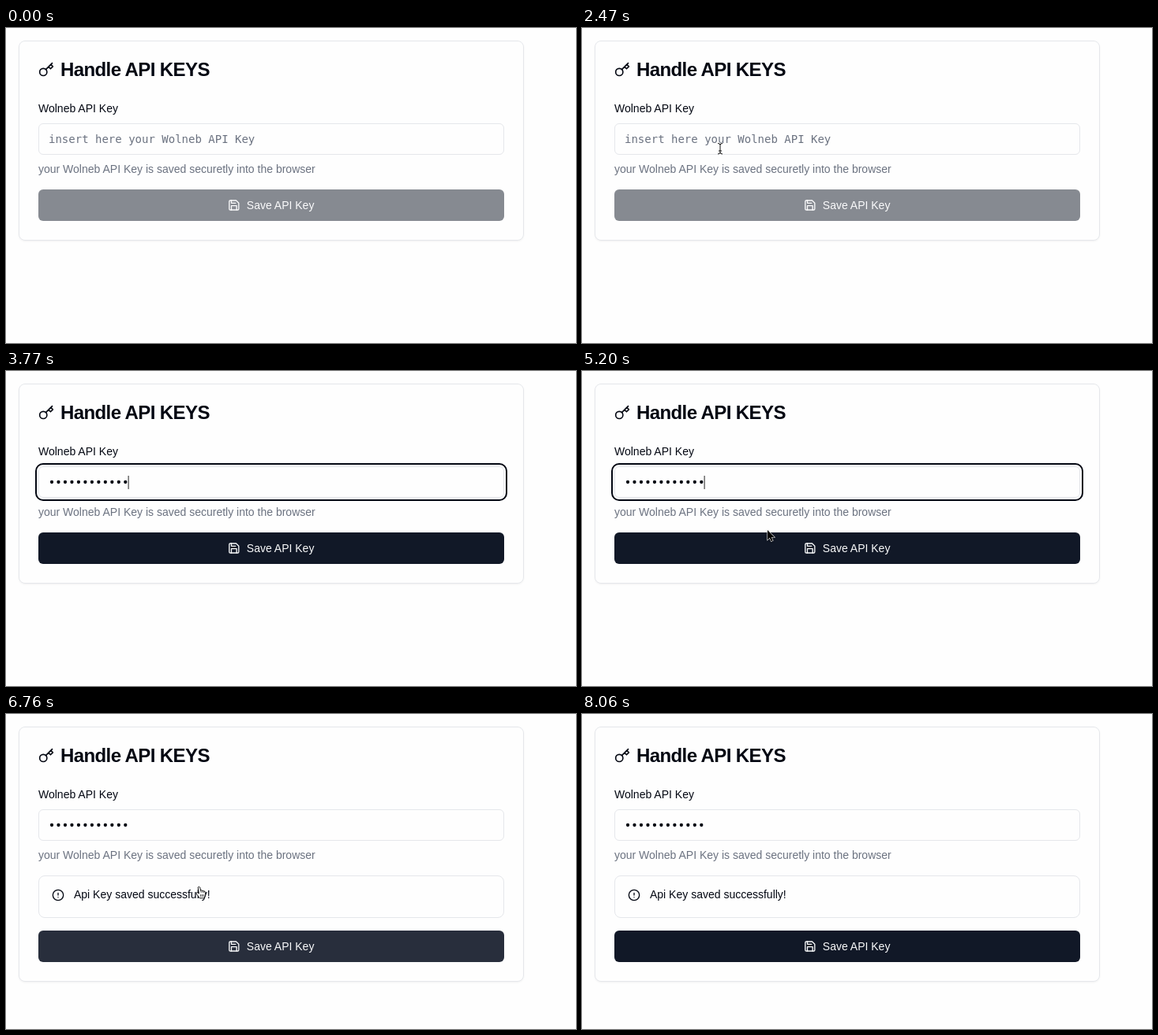
Recreate the animation shown at these times as an HTML page. Size 722 px wide and 400 px high, loop 9360 ms.

```html
<!DOCTYPE html>
<html lang="en">
<head>
<meta charset="utf-8">
<title>Handle API keys</title>
<style>
  html, body { margin: 0; width: 100%; height: 100%; overflow: hidden; background: #fefefe; }
  svg { display: block; }
  text { font: 14px "Liberation Sans", Arial, sans-serif; fill: #030712; }
  .title { font-size: 24px; font-weight: 700; letter-spacing: -0.6px; }
  .muted { fill: #6b7280; }
  .mono { font-family: "DejaVu Sans Mono", monospace; }
  .box { fill: none; stroke: #e5e7eb; }
  .icon { fill: none; stroke: #030712; stroke-width: 2; stroke-linecap: round; stroke-linejoin: round; }
  #button text { fill: #f9fafb; }
  #button .icon { stroke: #f9fafb; }
  #card { fill: #fefefe; filter: drop-shadow(0 1px 1px rgba(0, 0, 0, .05)); }
  .halo { fill: none; stroke: #fff; stroke-opacity: .7; stroke-width: 2.4; }
</style>
</head>
<body>
<svg width="722" height="400" viewBox="0 0 722 400">
  <rect id="card" class="box" x="16.5" y="16.5" width="639" height="253" rx="7.5"/>

  <g class="icon" transform="translate(41 43) scale(.8333)">
    <circle cx="7.5" cy="15.5" r="5.5"/>
    <path d="M21 2l-9.6 9.6M15.5 7.5l3 3L22 7l-3-3"/>
  </g>
  <text class="title" x="69" y="61">Handle API KEYS</text>

  <text x="41" y="107">Wolneb API Key</text>
  <rect class="box" x="41.5" y="121.5" width="589" height="39" rx="5.5"/>
  <rect id="ring" x="38" y="118" width="596" height="46" rx="9" fill="none" stroke="#030712" stroke-width="2"/>
  <text id="hint" class="mono muted" x="54" y="146">insert here your Wolneb API Key</text>
  <path id="dots" d="M58 141h94" fill="none" stroke="#030712" stroke-width="4.3" stroke-linecap="round" stroke-dasharray="0 8.48"/>
  <rect id="caret" y="133" width="1" height="17" fill="#222"/>
  <text class="muted" x="41" y="184">your Wolneb API Key is saved securetly into the browser</text>

  <g id="alert">
    <rect class="box" x="41.5" y="205.5" width="589" height="53" rx="7.5"/>
    <g class="icon" transform="translate(58 222) scale(.6667)">
      <circle cx="12" cy="12" r="10"/>
      <path d="M12 8v4M12 16h.01"/>
    </g>
    <text x="86" y="234">Api Key saved successfully!</text>
  </g>

  <g id="button">
    <rect id="face" x="41" y="205" width="590" height="40" rx="6" fill="#111827"/>
    <g class="icon" transform="translate(280.8 217) scale(.6667)">
      <path d="M19 21H5a2 2 0 0 1-2-2V5a2 2 0 0 1 2-2h11l5 5v11a2 2 0 0 1-2 2z"/>
      <path d="M17 21v-8H7v8M7 3v5h8"/>
    </g>
    <text x="304.8" y="230">Save API Key</text>
  </g>

  <g id="cursor">
    <path id="arrow" d="M0 0V12.4L2.8 9.8 4.7 14.2 6.8 13.3 4.9 9H8.8Z" fill="#000" stroke="#fff" stroke-width="1.1"
      paint-order="stroke" style="filter:drop-shadow(0 1px 1px rgba(0,0,0,.35))"/>
    <g id="beam">
      <path class="halo" d="M-3-6.5Q0-6.5 0-4.5V5Q0 7-3 7M3-6.5Q0-6.5 0-4.5M0 5Q0 7 3 7"/>
      <path d="M-3-6.5Q0-6.5 0-4.5V5Q0 7-3 7M3-6.5Q0-6.5 0-4.5M0 5Q0 7 3 7M-2 3H2" fill="none" stroke="#111"/>
    </g>
    <g id="hand" stroke="#000" stroke-width=".9" stroke-linejoin="round">
      <path d="M-1.8 1Q-.6-.6.6 1L1.6 5Q3 4.2 3.6 5.4 5 4.7 5.6 6 7.2 5.5 7.4 7.5V10.5Q7.2 13 5.8 14.8H.2Q-2 11.5-4.2 9-4 7.2-2.2 7.8L-.6 9Z" fill="#fff"/>
      <path d="M1.6 5l.5 2.6M3.6 5.4l.4 2.4M5.6 6l.2 2M1.6 10v3M3.4 10v3M5.2 10v3" fill="none" stroke-width=".7"/>
    </g>
  </g>
</svg>
<script>
const LOOP = 9360, TICK = 130;
const FOCUS = 2860, FILL = 3770, BLUR = 6370, SAVED = 6760;

// [time, x, y] of the pointer
const path = [
  [260, 330, 365], [390, 320, 312], [520, 316, 298], [1300, 316, 298],
  [1430, 194, 294], [2210, 180, 190], [2340, 180, 190], [2470, 175, 153],
  [2600, 173.5, 149], [4550, 173.5, 149], [4680, 176, 153], [5200, 235, 202],
  [5590, 245, 219], [7150, 245, 219], [7540, 201, 265], [7930, 132, 364]
];
// [time, strength] of the button highlight
const glow = [
  [5200, 0], [5460, 1], [6760, 1], [7020, 0], [7540, 0], [7670, .6], [7800, .4], [7930, 0]
];

const $ = id => document.getElementById(id);
const show = (id, on) => $(id).setAttribute("visibility", on ? "visible" : "hidden");
const within = (t, a, b) => t >= a && t < b;

function track(keys, t) {
  const i = keys.findIndex(k => k[0] > t);
  if (i < 0) return keys[keys.length - 1].slice(1);
  if (i === 0) return keys[0].slice(1);
  const a = keys[i - 1], b = keys[i], p = (t - a[0]) / (b[0] - a[0]);
  return a.slice(1).map((v, n) => v + (b[n + 1] - v) * p);
}

function pointerShape(x, y, t) {
  const saved = t > SAVED, top = saved ? 275 : 205;
  if (within(y, top, top + 40)) return "hand";
  const overText = within(y, 121, 161) || (x < 392 && within(y, 169, 189)) ||
    (saved && within(x, 86, 259) && within(y, 219, 239));
  return overText ? "beam" : "arrow";
}

function draw(t) {
  const filled = t >= FILL, saved = t >= SAVED;
  show("ring", within(t, FOCUS, BLUR));
  show("hint", !filled);
  show("dots", filled);
  show("alert", saved);
  $("card").setAttribute("height", saved ? 323 : 253);
  $("button").setAttribute("transform", `translate(0 ${saved ? 70 : 0})`);
  $("button").setAttribute("opacity", filled ? 1 : .5);
  $("face").setAttribute("fill-opacity", 1 - .1 * track(glow, t)[0]);

  // the blink restarts whenever the field changes
  const since = t - (filled ? FILL : FOCUS);
  show("caret", within(t, FOCUS, BLUR) && since % 1040 < 520);
  $("caret").setAttribute("x", filled ? 154.6 : 54);

  const [x, y] = track(path, t);
  const visible = within(t, 260, FILL) || within(t, 4680, 8060);
  const shape = pointerShape(x, y, t);
  $("cursor").setAttribute("transform", `translate(${x} ${y})`);
  for (const id of ["arrow", "beam", "hand"]) show(id, visible && id === shape);
}

const start = performance.now();
function frame() {
  const t = (performance.now() - start) % LOOP;
  draw(Math.floor(t / TICK) * TICK);
  requestAnimationFrame(frame);
}
frame();
</script>
</body>
</html>
```
